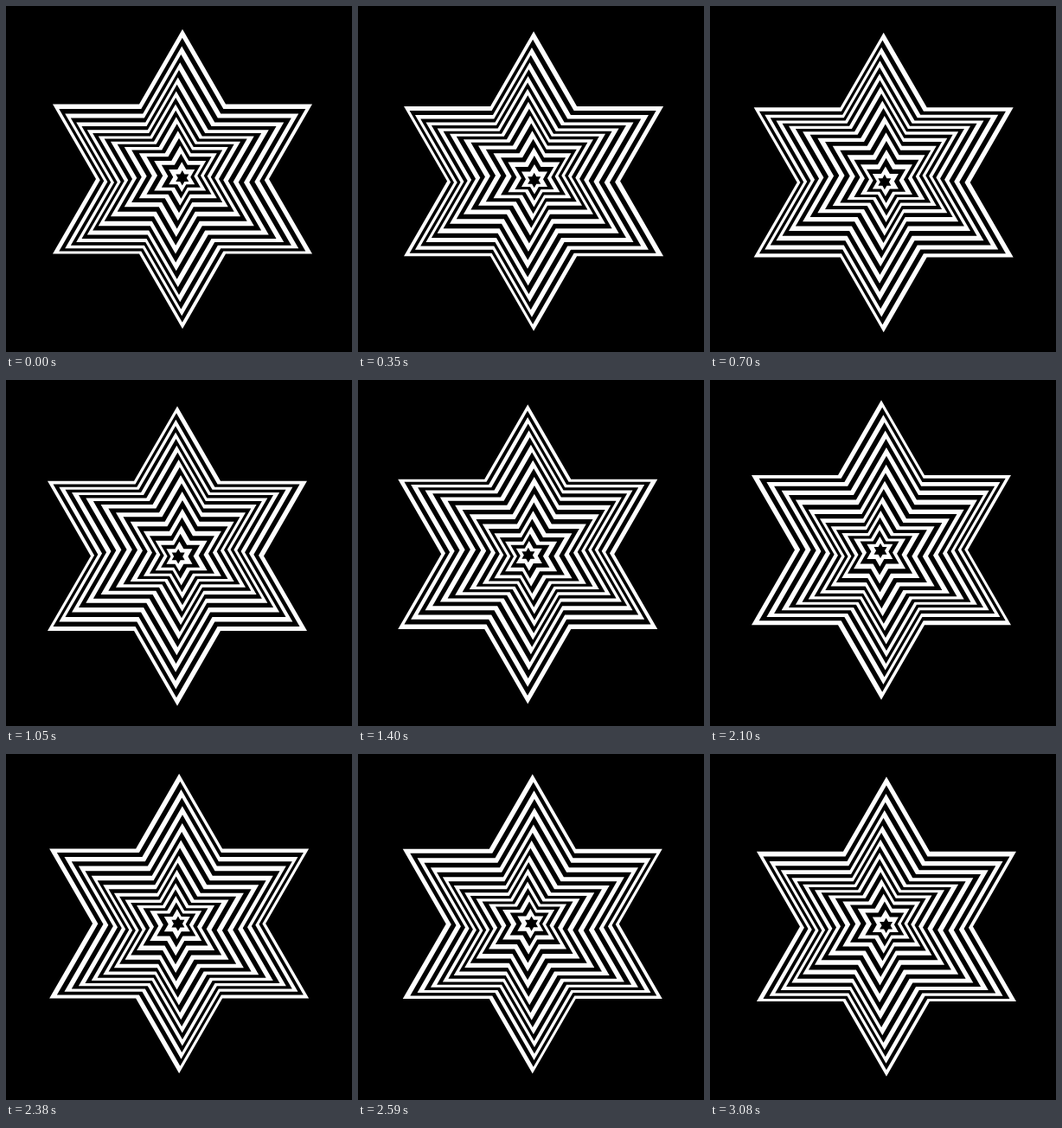
Write an HTML page that moves like this. It is 400 px wide and 400 px high and loops after 3150 ms.

```html
<!DOCTYPE html>
<html lang="en">
<head>
<meta charset="utf-8">
<title>Orbiting stars</title>
<style>
  html, body { margin: 0; width: 100%; height: 100%; overflow: hidden; background: #000; }
  svg { display: block; width: 100vw; height: 100vh; }
</style>
</head>
<body>
<svg id="stage" viewBox="0 0 400 400"></svg>
<script>
const LOOP = 3150;
const STEP = 70;
const COUNT = 20;
const NOTCH = 100; // notch radius of the largest star
const ORBIT = 4;
const TAU = Math.PI * 2;
const stage = document.getElementById('stage');

// Six-pointed star with one tip straight up.
function starPoints(notch) {
  return Array.from({ length: 12 }, (_, i) => {
    const radius = i % 2 ? notch : notch * Math.sqrt(3);
    const angle = i * TAU / 12 - TAU / 4;
    return `${(radius * Math.cos(angle)).toFixed(3)},${(radius * Math.sin(angle)).toFixed(3)}`;
  }).join(' ');
}

const stars = Array.from({ length: COUNT }, (_, i) => {
  const star = document.createElementNS('http://www.w3.org/2000/svg', 'polygon');
  star.setAttribute('points', starPoints(NOTCH * (1 - i / COUNT)));
  star.setAttribute('fill', i % 2 ? '#000' : '#fff');
  return stage.appendChild(star);
});

// Each star circles the centre, a fixed phase ahead of the one around it.
function render(time) {
  const progress = Math.floor((time % LOOP) / STEP) * STEP / LOOP;
  stars.forEach((star, i) => {
    const angle = TAU * (progress + i / COUNT);
    const x = 200 + ORBIT * Math.cos(angle);
    const y = 200 + ORBIT * Math.sin(angle);
    star.setAttribute('transform', `translate(${x.toFixed(3)} ${y.toFixed(3)})`);
  });
}

const start = performance.now();
function tick() {
  render(performance.now() - start);
  requestAnimationFrame(tick);
}
tick();
</script>
</body>
</html>
```
